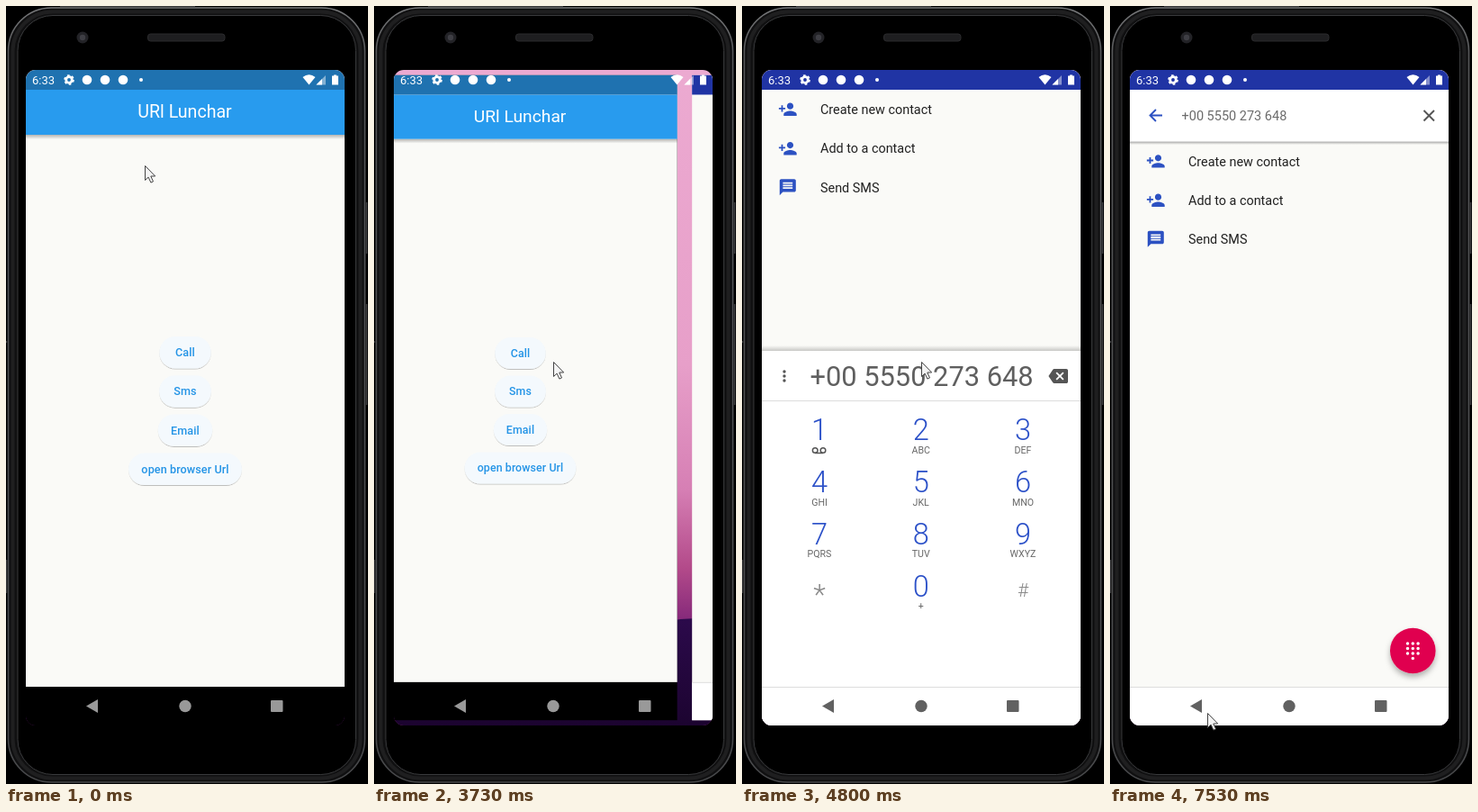
An HTML page that plays this animation: 402x864 px, repeating every 8 s.

```html
<!DOCTYPE html>
<html lang="en">
<head>
<meta charset="utf-8">
<title>Phone dialer demo</title>
<style>
  html, body { margin: 0; width: 100%; height: 100%; overflow: hidden; background: #000; }
  svg { display: block; font-family: Roboto, sans-serif; }
  .mid { text-anchor: middle; }
  .blue { fill: #2c51c2; }
</style>
</head>
<body>
<svg width="402" height="864" viewBox="0 0 402 864">
  <defs>
    <clipPath id="screen"><rect x="22" y="71" width="354" height="728" rx="11"/></clipPath>
    <linearGradient id="rim" x2="0" y2="1">
      <stop offset="0" stop-color="#77787a"/><stop offset=".06" stop-color="#58595b"/>
      <stop offset="1" stop-color="#48494b"/>
    </linearGradient>
    <linearGradient id="sky" x2="0" y2="1">
      <stop offset="0" stop-color="#ecaad1"/><stop offset=".45" stop-color="#e79fc9"/>
      <stop offset=".64" stop-color="#d67fb4"/><stop offset=".76" stop-color="#b34a8a"/>
      <stop offset=".84" stop-color="#85297a"/>
    </linearGradient>
    <linearGradient id="hill" x2="0" y2="1">
      <stop offset="0" stop-color="#2c0a4c"/><stop offset="1" stop-color="#1c0430"/>
    </linearGradient>
    <linearGradient id="down" x2="0" y2="1">
      <stop offset="0" stop-opacity=".28"/><stop offset="1" stop-opacity="0"/>
    </linearGradient>
    <linearGradient id="up" x2="0" y2="1">
      <stop offset="0" stop-opacity="0"/><stop offset="1" stop-opacity=".2"/>
    </linearGradient>
    <filter id="lift" x="-30%" y="-30%" width="160%" height="180%">
      <feDropShadow dx="0" dy="1" stdDeviation=".6" flood-opacity=".24"/>
    </filter>
    <filter id="float" x="-40%" y="-40%" width="180%" height="200%">
      <feDropShadow dx="0" dy="4" stdDeviation="3" flood-opacity=".3"/>
    </filter>
    <path id="person" d="M15 12c2.21 0 4-1.79 4-4s-1.79-4-4-4-4 1.79-4 4 1.79 4 4 4zm-9-2V7H4v3H1v2h3v3h2v-3h3v-2H6zm9 4c-2.67 0-8 1.34-8 4v2h16v-2c0-2.66-5.33-4-8-4z"/>
    <path id="message" d="M20 2H4c-1.1 0-2 .9-2 2v18l4-4h14c1.1 0 2-.9 2-2V4c0-1.1-.9-2-2-2zM6 9h12v2H6V9zm12 5H6v-2h12v2zm0-6H6V6h12v2z"/>
  </defs>

  <!-- phone body -->
  <rect x="2.5" y="2" width="396" height="860" rx="48" fill="#101011" stroke="url(#rim)" stroke-width="1.6"/>
  <rect x="7.5" y="6.5" width="386" height="851" rx="44" fill="none" stroke="#1f1f20" stroke-width="4"/>
  <rect x="13" y="10.5" width="375.5" height="843" rx="39" stroke="#3a3b3d"/>
  <path d="M60 .5h150M400.5 218v57M400.5 331v112M.5 372v2M.5 615v37" stroke="#3c3c3e" stroke-width="1.6"/>
  <circle cx="85" cy="35" r="6.5" fill="#232327"/>
  <circle cx="85" cy="35" r="3.2" fill="#3e3e44"/>
  <rect x="157.5" y="31" width="85.5" height="8" rx="3" fill="#1e1e20" stroke="#2b2b2d"/>

  <g clip-path="url(#screen)">
    <rect x="22" y="71" width="354" height="728" fill="url(#sky)"/>
    <path d="M22 688L60 681 120 690 200 676 290 690 340 681 376 679V799H22z" fill="url(#hill)"/>

    <g id="home">
      <rect x="22" y="71" width="354" height="728"/>
      <rect x="22" y="71" width="354" height="685" fill="#fafaf7"/>
      <rect x="22" y="143" width="354" height="5" fill="url(#down)"/>
      <rect x="22" y="93" width="354" height="50" fill="#289bee"/>
      <rect x="22" y="71" width="354" height="22" fill="#1f72b0"/>
      <text class="mid" x="198.5" y="124" font-size="19.6" fill="#fff">URl Lunchar</text>
    </g>

    <g id="dial">
      <rect x="22" y="71" width="354" height="728" fill="#fafaf7"/>
      <g id="list">
        <use href="#person" class="blue" transform="translate(40 104)scale(.9)"/>
        <use href="#person" class="blue" transform="translate(40 147.4)scale(.9)"/>
        <use href="#message" class="blue" transform="translate(40 190.4)scale(.9)"/>
        <g font-size="14.4" fill="#212121">
          <text x="87" y="120">Create new contact</text>
          <text x="87" y="163.4">Add to a contact</text>
          <text x="87" y="206.5">Send SMS</text>
        </g>
      </g>
      <g id="search">
        <rect x="22" y="151" width="354" height="3" fill="url(#down)"/>
        <rect x="22" y="93" width="354" height="58" fill="#fff"/>
        <path d="M22 151h354" stroke="#bbb"/>
        <path d="M58 121.5H45M51 115l-6.5 6.5 6.5 6.5" fill="none" stroke="#2c51c2" stroke-width="1.8"/>
        <text class="number" x="79.5" y="126.7" font-size="14.5" fill="#6b6b6b"></text>
        <path d="M348.5 116l11.5 11.5M360 116l-11.5 11.5" stroke="#555" stroke-width="1.9"/>
      </g>
      <rect x="22" y="71" width="354" height="22" fill="#2034a4"/>
      <g id="pad">
        <rect x="22" y="371" width="354" height="6" fill="url(#up)"/>
        <rect x="22" y="377" width="354" height="422" fill="#fff"/>
        <path d="M22 432.5h354" stroke="#ddd"/>
        <g fill="#555">
          <circle cx="47" cy="400" r="1.7"/><circle cx="47" cy="405" r="1.7"/><circle cx="47" cy="410" r="1.7"/>
          <path transform="translate(340.4 394.2)scale(.9)" d="M22 3H7c-.69 0-1.23.35-1.59.88L0 12l5.41 8.11c.36.53.9.89 1.59.89h15c1.1 0 2-.9 2-2V5c0-1.1-.9-2-2-2zm-3 12.59L17.59 17 14 13.41 10.41 17 9 15.59 12.59 12 9 8.41 10.41 7 14 10.59 17.59 7 19 8.41 15.41 12 19 15.59z"/>
        </g>
        <text class="number" x="75.5" y="416.5" font-size="30.8" fill="#5f5f5f"></text>
        <g fill="none" stroke="#555" stroke-width="1.5">
          <circle cx="81.2" cy="487.5" r="2.8"/><circle cx="90" cy="487.5" r="2.8"/><path d="M81 490.5h9"/>
        </g>
        <g id="keys" class="mid"></g>
        <g id="call">
          <circle r="25.3" fill="#13e356" filter="url(#float)"/>
          <path fill="#fff" transform="scale(.9)translate(-12 -12)" d="M6.62 10.79c1.44 2.83 3.76 5.14 6.59 6.59l2.2-2.2c.27-.27.67-.36 1.02-.24 1.12.37 2.33.57 3.57.57.55 0 1 .45 1 1V20c0 .55-.45 1-1 1-9.39 0-17-7.61-17-17 0-.55.45-1 1-1h3.5c.55 0 1 .45 1 1 0 1.25.2 2.45.57 3.57.11.35.03.74-.25 1.02l-2.2 2.2z"/>
        </g>
      </g>
      <g id="open">
        <circle r="25.3" fill="#e0044f" filter="url(#float)"/>
        <path d="M-5.8-8h0m5.8 0h0m5.8 0h0M-5.8-2.5h0m5.8 0h0m5.8 0h0M-5.8 3h0m5.8 0h0m5.8 0h0M0 8.5h0" stroke="#fff" stroke-width="3.5" stroke-linecap="round"/>
      </g>
      <rect x="22" y="756" width="354" height="43" fill="#fff"/>
      <path d="M22 756.5h354" stroke="#ddd"/>
    </g>

    <rect id="ripple" x="51" y="756" width="91" height="43" rx="21.5" fill="#e2e2e2"/>
    <g id="nav">
      <path d="M89 777.5L102 770v15z"/><circle cx="199" cy="777.5" r="6.7"/>
      <rect x="294" y="771" width="13.5" height="13" rx="1"/>
    </g>
    <g fill="#fff">
      <text x="29" y="87" font-size="13">6:33</text>
      <circle cx="70" cy="82" r="3.3" fill="none" stroke="#fff" stroke-width="2.8"/>
      <circle cx="70" cy="82" r="5" fill="none" stroke="#fff" stroke-width="1.7" stroke-dasharray="2.6 2.636"/>
      <circle cx="90" cy="82" r="5.3"/><circle cx="110" cy="82" r="5.3"/><circle cx="130" cy="82" r="5.3"/>
      <circle cx="150" cy="82" r="2"/>
      <path d="M329.5 79q7-5.5 14 0l-7 8.5z"/>
      <path d="M355 77v10.5h-10.5z" fill-opacity=".45"/><path d="M351 81v6.5h-6.5z"/>
      <path d="M364 76.5h3v1h2v10h-7v-10h2z"/>
    </g>
  </g>
  <path id="cursor" d="M.5.5v16l3.6-3.4 2.8 6 2.6-1.2-2.7-5.9h4.9z" fill="#f4f4f4" stroke="#444"/>
</svg>
<script>
const $ = id => document.getElementById(id);
const clamp = v => Math.max(0, Math.min(1, v));

for (const el of document.querySelectorAll('.number')) el.textContent = '+00 5550 273 648';

const buttons = [['Call', 57.5], ['Sms', 58], ['Email', 60.5], ['open browser Url', 126]];
$('home').insertAdjacentHTML('beforeend', buttons.map(([label, w], i) => {
  const y = 385 + 43.2 * i;
  return `<rect x="${199 - w / 2}" y="${y - 18}" width="${w}" height="35.5" rx="17.75" fill="#f4f9fd" filter="url(#lift)"/>
    <text class="mid" x="199" y="${y + 4.2}" font-size="12.6" font-weight="500" letter-spacing=".1" fill="#2494e6">${label}</text>`;
}).join(''));

const keys = ['1', '2 ABC', '3 DEF', '4 GHI', '5 JKL', '6 MNO', '7 PQRS', '8 TUV', '9 WXYZ', '*', '0 +', '#'];
$('keys').innerHTML = keys.map((key, i) => {
  const [digit, letters = ''] = key.split(' ');
  const x = [86, 198.7, 312][i % 3], y = 476.5 + 57.7 * (i / 3 | 0);
  const [size, dy] = { '*': [32, 8.5], '#': [21, 0] }[digit] || [32.6, 0];
  const color = '*#'.includes(digit) ? '#888' : '#2c51c8';
  return `<text x="${x}" y="${y + dy}" font-size="${size}" font-weight="300" fill="${color}">${digit}</text>
    <text x="${x}" y="${y + 14.6}" font-size="10.6" fill="#666">${letters}</text>`;
}).join('');

// Tracks are [tick, ...values], linear between entries.
const pointer = [[0, 154, 177], [4, 180, 191], [8, 200, 205], [13, 200, 205], [15, 193, 201], [20, 193, 201],
  [21, 191, 256], [24, 187, 335], [27, 195, 411], [30, 199, 395], [81, 199, 395], [84, 186, 440],
  [88, 145, 610], [92, 111, 770], [94, 108, 785]];
const zoom = [[55, 1], [56, .984], [57, .96], [58, .946], [59, .953], [60, .97], [62, .991], [64, 1]];
const swipe = [[55, 0], [56, .1], [57, .5], [58, .85], [59, .973], [60, 1]];

function at(track, k) {
  const i = track.findIndex(p => p[0] > k);
  if (i < 0) return track[track.length - 1].slice(1);
  if (!i) return track[0].slice(1);
  const a = track[i - 1], b = track[i], f = (k - a[0]) / (b[0] - a[0]);
  return a.slice(1).map((v, j) => v + (b[j + 1] - v) * f);
}
const move = (id, x, y, scale = 1) => $(id).setAttribute('transform', `translate(${x} ${y})scale(${scale})`);
const show = (id, on) => $(id).style.display = on ? '' : 'none';
const grow = (k, from, to) => 1 - (1 - clamp((k - from) / (to - from))) ** 2;

function draw(k) {
  const [s] = at(zoom, k), [p] = at(swipe, k), pitch = 354 * s + 16.5;
  const place = (id, dx) => move(id, 199 * (1 - s) + dx, 435 * (1 - s), s);
  place('home', -p * pitch);
  place('dial', (1 - p) * pitch);

  // dial pad rises, later drops to reveal the search bar
  const rise = 1 - clamp((k - 67) / 6.6), drop = clamp((k - 102) / 5);
  const back = grow(k, 102, 108);
  show('list', k >= 68);
  show('pad', k >= 68 && drop < 1);
  move('pad', 0, 421 * (rise ** 3 + drop ** 2));
  move('call', 199, 716, grow(k, 72, 77));
  move('list', 0, 57.6 * back);
  show('search', back > 0);
  move('search', 0, 58 * (back - 1));
  show('open', k > 104);
  move('open', 336.3, 716, grow(k, 104, 108));

  $('ripple').style.opacity = clamp((k - 97) / 4) * clamp((108 - k) / 5);
  $('nav').style.fill = k < 58 ? '#999' : k < 64 ? '#777' : '#616161';
  move('cursor', ...at(pointer, k));
}

const TICK = 1000 / 15;
function loop() {
  draw(Math.floor((performance.now() % 8000 + 4) / TICK));
  requestAnimationFrame(loop);
}
loop();
</script>
</body>
</html>
```
